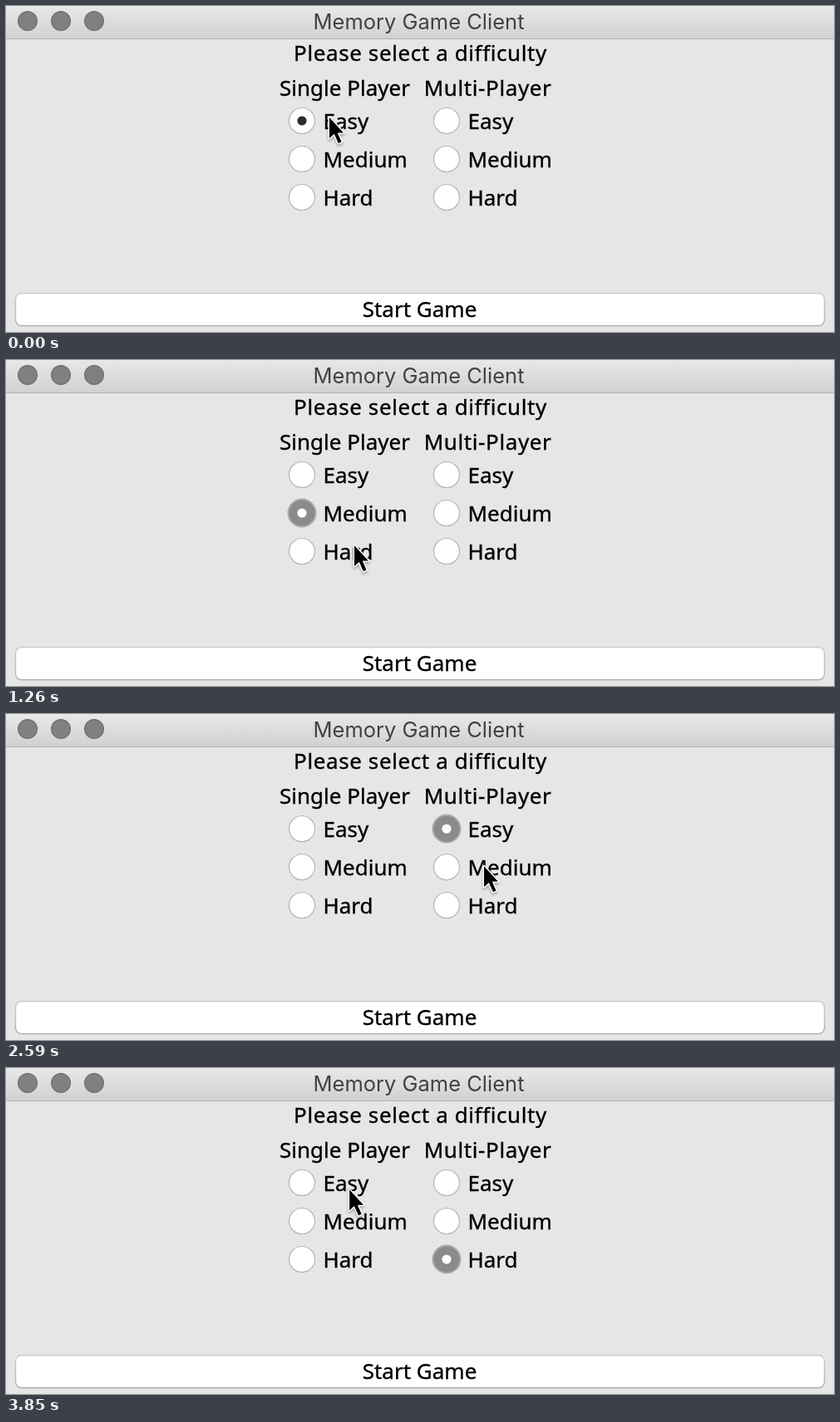
Animation of 996 by 392 pixels, one loop 3920 ms. Source, as an HTML page:

```html
<!DOCTYPE html>
<html lang="en">
<head>
<meta charset="utf-8">
<title>Memory Game Client</title>
<style>
  html, body { margin: 0; width: 100%; height: 100%; overflow: hidden; background: #e6e6e6; }
  svg { display: block; width: 100%; height: 100%; }
  text { font: 26px "Noto Sans", "Open Sans", sans-serif; stroke: #000; stroke-width: .35px; }
  .middle { text-anchor: middle; }
  .title { font: 25.5px Inter, Roboto, sans-serif; fill: #424242; stroke: none; }
  .wide { letter-spacing: .6px; }
  .lights { fill: #808080; stroke: #6d6d6d; stroke-width: 1.2; }
  .ring { fill: #fff; stroke: #b5b5b5; stroke-width: 1.2; }
  .dot { fill: none; }
  .idle .dot { fill: #2b2b2b; }
  .on .ring { fill: #8b8b8e; stroke: #aaaaac; stroke-width: 2; r: 16.5px; }
  .on .dot { fill: #fff; }
  .cursor { stroke: #fff; stroke-width: 3; stroke-linejoin: round; paint-order: stroke;
    filter: drop-shadow(0 2px 1.5px rgba(0, 0, 0, .3)); }
</style>
</head>
<body>
<svg viewBox="0 0 996 392">
  <defs>
    <linearGradient id="bar" x2="0" y2="1">
      <stop stop-color="#e8e8e8"/><stop offset="1" stop-color="#d1d1d1"/>
    </linearGradient>
    <linearGradient id="edge" x2="0" y2="1">
      <stop stop-color="#cdcdcd"/><stop offset="1" stop-color="#adadad"/>
    </linearGradient>
  </defs>
  <rect width="996" height="392" fill="#e6e6e6"/>
  <rect width="996" height="39" fill="url(#bar)"/>
  <rect y="39" width="996" height="1" fill="#b3b3b3"/>
  <g class="lights">
    <circle cx="26" cy="18" r="11.4"/><circle cx="66" cy="18" r="11.4"/><circle cx="106" cy="18" r="11.4"/>
  </g>
  <text class="middle title" x="496.5" y="28">Memory Game Client</text>
  <text class="middle wide" x="498.5" y="66">Please select a difficulty</text>
  <text class="middle" x="407.5" y="108">Single Player</text>
  <text class="middle wide" x="579.5" y="108">Multi-Player</text>
  <g id="options"></g>
  <rect x="11.5" y="345.5" width="973" height="39" rx="7" fill="#fff" stroke="url(#edge)" stroke-width="1.4"/>
  <text class="middle" x="497.5" y="374">Start Game</text>
  <path id="cursor" class="cursor" d="M1 1V26L6.8 20.8L11.8 32L15.6 30.4L10.8 19.5H18Z"/>
</svg>
<script>
  const LOOP = 3920, STEP = 70, PAUSE = 210;
  const options = document.getElementById('options');
  const cursor = document.getElementById('cursor');

  // The pointer reaches each option, pauses, clicks, then heads for the next.
  const stops = [
    { at: 0, x: 388, y: 133 },
    { at: 630, x: 401, y: 188 },
    { at: 1260, x: 418, y: 222 },
    { at: 2030, x: 572, y: 125 },
    { at: 2590, x: 574, y: 182 },
    { at: 3080, x: 581, y: 231 }
  ];

  for (const x of [356, 530]) {
    ['Easy', 'Medium', 'Hard'].forEach((label, row) => {
      const y = 138 + row * 46;
      options.insertAdjacentHTML('beforeend',
        `<g><circle class="ring" cx="${x}" cy="${y}" r="15.5"/>` +
        `<circle class="dot" cx="${x}" cy="${y}" r="5.6"/>` +
        `<text x="${x + 25.5}" y="${y + 10}">${label}</text></g>`);
    });
  }

  function pointerAt(t) {
    const i = stops.findLastIndex(stop => stop.at <= t);
    const from = stops[i], to = stops[i + 1] || { ...stops[0], at: LOOP };
    const leave = from.at + PAUSE + STEP;
    const k = Math.max(0, (t - leave) / (to.at - leave));
    return [from.x + (to.x - from.x) * k, from.y + (to.y - from.y) * k];
  }

  function draw() {
    const t = Math.floor(performance.now() % LOOP / STEP) * STEP;
    const clicked = stops.findLastIndex(stop => stop.at + PAUSE <= t);
    [...options.children].forEach((option, i) => {
      const idle = clicked < 0 && i === 0;
      option.setAttribute('class', i === clicked ? 'on' : idle ? 'idle' : '');
    });
    cursor.setAttribute('transform', `translate(${pointerAt(t)})`);
    requestAnimationFrame(draw);
  }
  draw();
</script>
</body>
</html>
```
